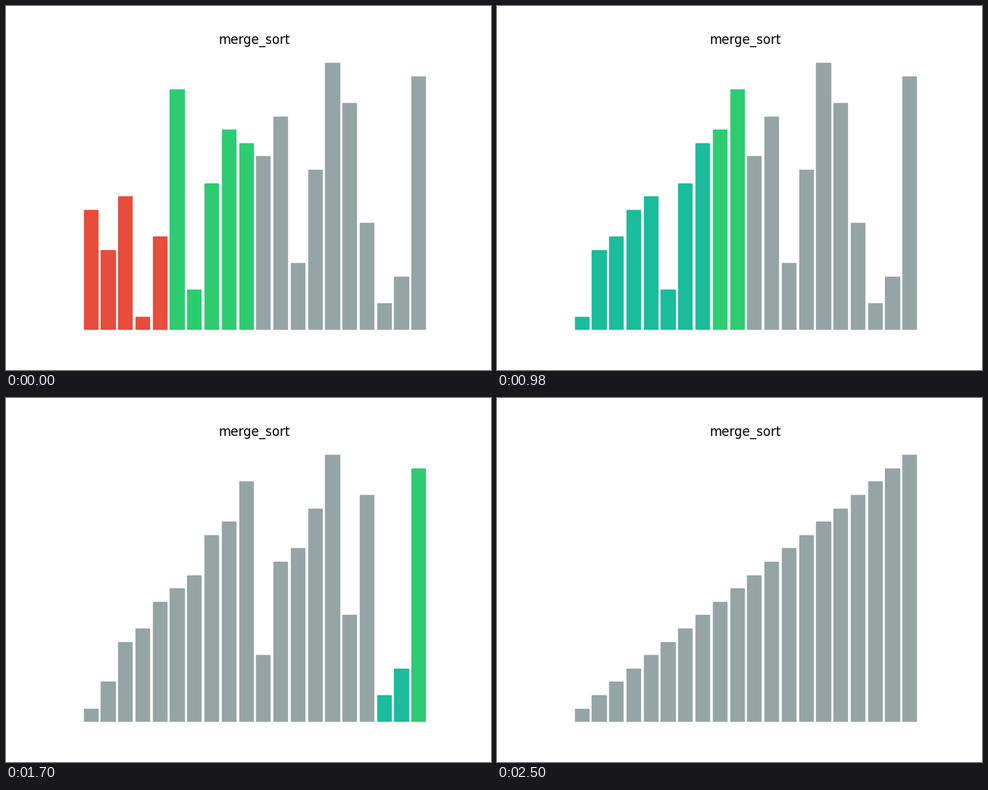
These frames come from a looping animation (640x480 px, 2520 ms). A matplotlib script:

```python
import matplotlib.pyplot as plt
from matplotlib.animation import FuncAnimation

LEFT, RIGHT, TAKEN, IDLE = "#e74c3c", "#2ecc71", "#1abc9c", "#95a5a6"
START = [9, 6, 10, 1, 7, 18, 3, 11, 15, 14,
         13, 16, 5, 12, 20, 17, 8, 2, 4, 19]


def snapshot(values, lo, mid, hi, taken=()):
    """Heights and colours while the halves lo:mid and mid:hi are active."""
    colors = [IDLE] * len(values)
    colors[lo:mid] = [LEFT] * (mid - lo)
    colors[mid:hi] = [RIGHT] * (hi - mid)
    for k in taken:
        colors[k] = TAKEN
    return list(values), colors


def merge_sort(values, lo, hi):
    if hi - lo < 2:
        return
    mid = (lo + hi) // 2
    yield snapshot(values, lo, mid, hi)
    yield from merge_sort(values, lo, mid)
    yield from merge_sort(values, mid, hi)

    # Both halves are sorted, so a merge takes items by ascending value.
    order = sorted(range(lo, hi), key=lambda k: values[k])
    for n in range(len(order) + 1):
        yield snapshot(values, lo, mid, hi, order[:n])
    values[lo:hi] = [values[k] for k in order]


data = list(START)
states = list(merge_sort(data, 0, len(data)))[1:]  # skip the top-level split
states.append((data, [IDLE] * len(data)))

plt.rcParams["font.family"] = "DejaVu Sans"
fig, ax = plt.subplots(figsize=(6.4, 4.8), dpi=100)
bars = ax.bar(range(len(START)), START)
ax.set_title("merge_sort")
ax.axis("off")


def update(i):
    for bar, height, color in zip(bars, *states[i]):
        bar.set_height(height)
        bar.set_color(color)
    return bars.patches


anim = FuncAnimation(fig, update, frames=len(states), interval=20,
                     repeat=True, repeat_delay=0)
plt.show()
```
